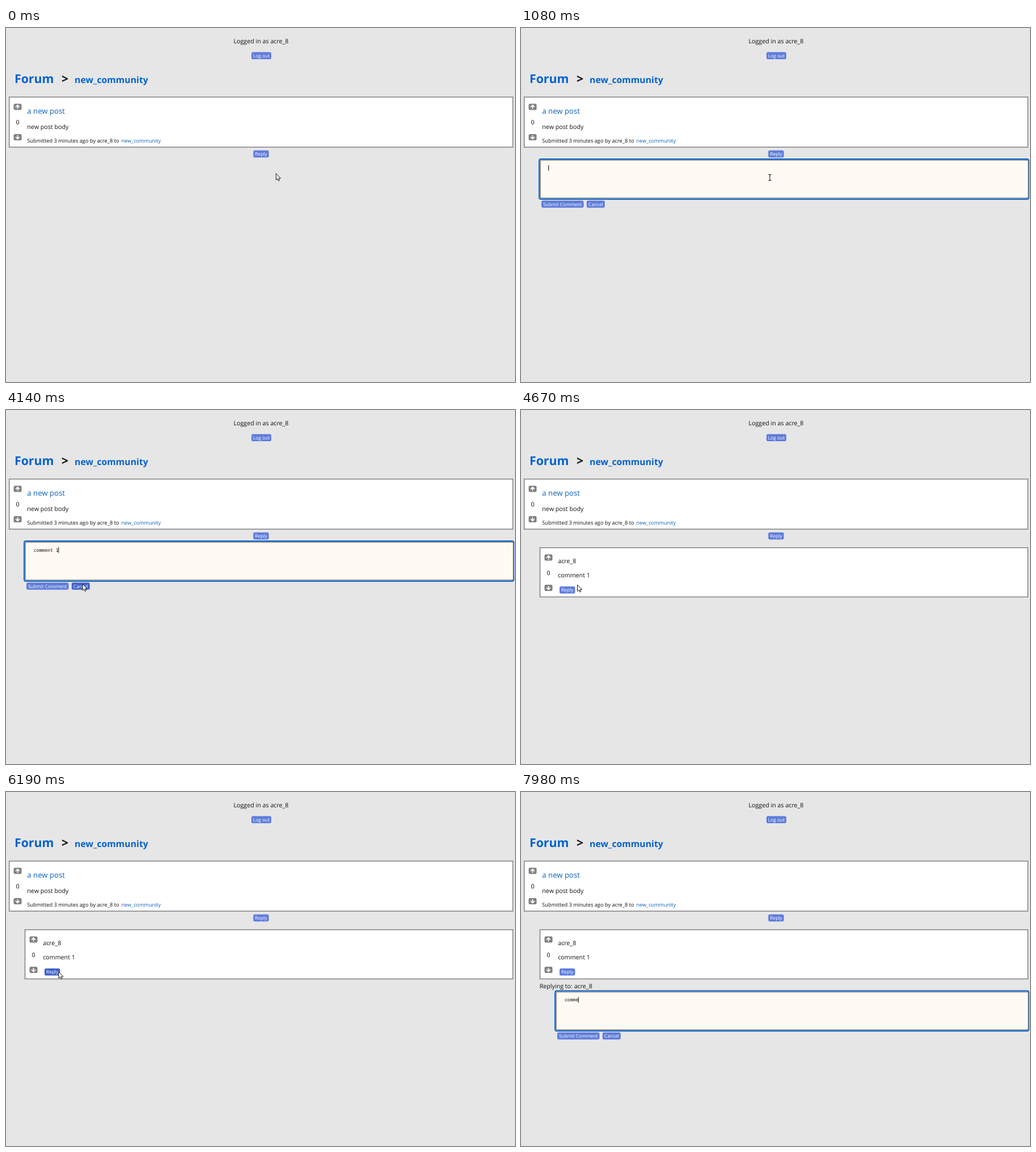
Write an HTML page that moves like this. It is 898 by 624 pixels and loops after 8000 ms.

```html
<!DOCTYPE html>
<html lang="en">
<head>
<meta charset="utf-8">
<title>Forum thread</title>
<style>
html, body { margin: 0; width: 100%; height: 100%; overflow: hidden; background: #e6e6e6; }
svg { display: block; font-family: "Open Sans", "Noto Sans", sans-serif; text-rendering: geometricPrecision; }
</style>
</head>
<body>
<svg id="stage" width="898" height="624" viewBox="0 0 898 624"></svg>
<script>
const LOOP = 8000, STEP = 1000 / 15;
const USER = 'acre_8', LINK = '#0b62bd', HEAD = '#0062cc', INK = '#111', GRAY = '#808080';
const stage = document.getElementById('stage');

// Pointer stops: time, x, y
const path = [
  [0, 476.5, 256.5], [330, 461.5, 222], [600, 461.5, 222], [860, 439, 263.5],
  [1210, 439, 263.5], [1270, 434, 255.5], [3800, 434, 255.5], [3870, 421, 257],
  [4000, 300, 283], [4130, 135.5, 306.5], [4390, 99.5, 308], [5000, 99.5, 308],
  [5200, 121.5, 310.5], [5470, 207, 298], [5600, 200, 287], [5860, 143, 298.5],
  [6190, 82.5, 320.5], [6530, 82.5, 320.5], [6860, 220, 385], [7120, 226, 388]
];
// Moments at which each next letter of the comment appears
const firstKeys = [1670, 2010, 2070, 2210, 2340, 2470, 2610, 3740, 3800];
const secondKeys = [7120, 7650, 7720, 7850, 7980];

const within = (t, a, b) => t >= a && t < b;

function text(s, x, y, size = 10.7, fill = INK, extra = '') {
  return `<text x="${x}" y="${y}" font-size="${size}" fill="${fill}" ${extra}>${s}</text>`;
}

function box(x, y, w, h, fill, rx = 0, stroke = 'none', line = 1.5) {
  return `<rect x="${x}" y="${y}" width="${w}" height="${h}" rx="${rx}" fill="${fill}" stroke="${stroke}" stroke-width="${line}"/>`;
}

function button(label, x, y, w, mouse) {
  const over = mouse && mouse.x >= x && mouse.x <= x + w && mouse.y >= y && mouse.y <= y + 12.5;
  return box(x, y, w, 12.5, over ? '#4263cb' : '#5f7cdb', 2.8) +
    text(label, x + w / 2, y + 9.4, 8.4, '#fff', 'text-anchor="middle"');
}

function arrow(x, y, flip) {
  return `<g transform="translate(${x} ${y}) scale(1 ${flip})">` + box(-7, -5.5, 14, 11, GRAY, 2.5) +
    '<path d="M0 3.6V-2.8M-3.4 .4L0-3L3.4 .4" fill="none" stroke="#fff" stroke-width="1.8"/></g>';
}

function votes(x, y) {
  return arrow(x, y, 1) + text('0', x, y + 31, 10.7, INK, 'text-anchor="middle"') + arrow(x, y + 53.5, -1);
}

function form(x, y, typed, focus, caret, mouse) {
  const end = x + 15.2 + typed.length * 4.9;
  return (focus ? box(x - 1.4, y - 1.4, 897.4 - x - .2, 70.8, 'none', 3, '#0060cc', 2) : '') +
    box(x + .7, y + .7, 894.3 - x, 66.8, '#fffaf3', 2, GRAY) +
    text(typed, x + 15.2, y + 17.3, 8.1, INK, 'font-family="DejaVu Sans Mono, monospace"') +
    (caret ? box(end - .5, y + 9.5, 1, 10, '#000') : '') +
    button('Submit Comment', x + 2.5, y + 72, 74.5, mouse) +
    button('Cancel', x + 82.3, y + 72, 32, mouse);
}

function page(mouse) {
  return text(`Logged in as ${USER}`, 450, 26.5, 10.7, INK, 'text-anchor="middle"') +
    button('Log out', 433, 42.5, 35, mouse) +
    text('Forum', 15, 97, 21.3, HEAD, 'font-weight="700"') +
    text('&gt;', 98, 97, 21.3, INK, 'font-weight="700"') +
    text('new_community', 121, 97, 15.8, HEAD, 'font-weight="700"') +
    box(5.7, 121.7, 888.6, 88.3, '#fff', 0, GRAY) + votes(20.5, 139) +
    text('a new post', 37.3, 151, 13.2, LINK) +
    text('new post body', 37.3, 177.5) +
    text(`Submitted 3 minutes ago by ${USER} to`, 37.3, 202, 9.25) +
    text('new_community', 203.5, 202, 9.1, LINK) +
    button('Reply', 436.3, 215.8, 27.4, mouse);
}

function comment(mouse) {
  return box(33.5, 242.7, 860.8, 86.8, '#fff', 0, GRAY) + votes(48.5, 260) +
    text(USER, 65.2, 269.5) + text('comment 1', 65.2, 295) +
    button('Reply', 68, 311, 27.4, mouse);
}

function pointerAt(t) {
  if (within(t, 1540, 3870) || t >= 7120) return null;
  const now = Math.floor(t / STEP + .1) * STEP;
  const i = Math.max(1, path.findIndex(p => p[0] >= now));
  const [a, ax, ay] = path[i - 1], [b, bx, by] = path[i];
  const k = (now - a) / (b - a);
  return { x: ax + (bx - ax) * k, y: ay + (by - ay) * k };
}

function pointer(mouse, field) {
  if (!mouse) return '';
  const beam = field !== null && mouse.x > field.x && within(mouse.y, field.y, field.y + 68);
  const shape = beam
    ? '<path d="M-2.5-5.2H2.5M0-5.2V5.2M-2.5 5.2H2.5" fill="none" stroke="#000"/>'
    : '<path d="M0 0V11.5L2.7 9.2L4.4 13L6.2 12.2L4.6 8.5H8Z" fill="#fff" stroke="#000" stroke-width=".9"/>';
  return `<g transform="translate(${mouse.x} ${mouse.y})">${shape}</g>`;
}

function draw(t) {
  const mouse = pointerAt(t);
  const typed = keys => 'comment 1'.slice(0, keys.filter(k => t >= k).length);
  let out = page(mouse), field = null;
  if (within(t, 470, 4670)) {
    field = { x: 33.5, y: 232.3 };
    const focus = within(t, 1010, 4600);
    const caret = focus && !within(t, 1540, 1670) && !within(t, 3140, 3670);
    out += form(field.x, field.y, typed(firstKeys), focus, caret, mouse);
  }
  if (t >= 4670) out += comment(mouse);
  if (t >= 6390) {
    field = { x: 61.5, y: 351.8 };
    const focus = t >= 6860;
    out += text(`Replying to: ${USER}`, 32.7, 345.5) +
      form(field.x, field.y, typed(secondKeys), focus, focus && !within(t, 7380, 7590), mouse);
  }
  stage.innerHTML = out + pointer(mouse, field);
}

const start = performance.now();
function tick() {
  draw((performance.now() - start) % LOOP);
  requestAnimationFrame(tick);
}
tick();
</script>
</body>
</html>
```
